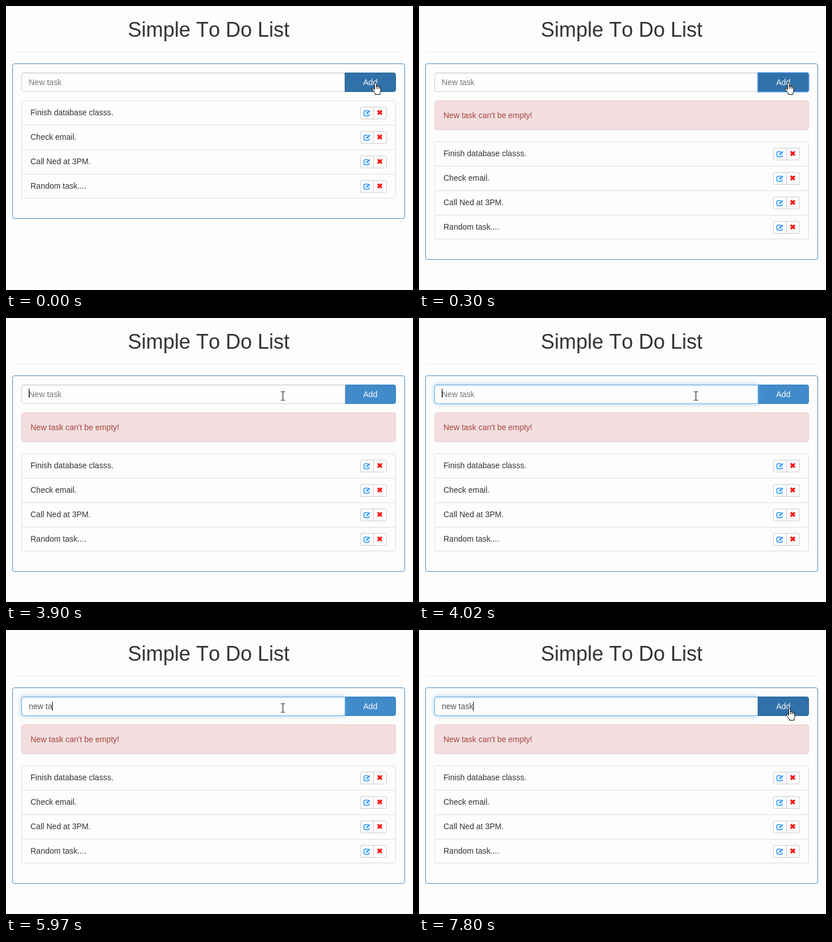
An HTML page that plays this animation: 715 px wide and 499 px high, repeating every 8 s.

```html
<!DOCTYPE html>
<html lang="en">
<head>
<meta charset="utf-8">
<title>Simple To Do List</title>
<style>
* { box-sizing: border-box; }
html, body { margin: 0; width: 100%; height: 100%; overflow: hidden; background: #fdfdfd; }
body { font: 14px/20px "Liberation Sans", Arial, sans-serif; font-kerning: none; color: #333; }
#stage { position: relative; width: 715px; height: 499px; overflow: hidden; }
h1 {
  position: absolute; left: 11px; top: 21px; width: 690px; height: 60px; margin: 0;
  font-size: 36px; font-weight: 400; line-height: 41px; text-align: center;
  border-bottom: 1px solid #eee;
}
#panel {
  position: absolute; left: 11px; top: 101px; width: 690px; padding: 15px;
  border: 1px solid #428bca; border-radius: 4px;
}
#form { position: relative; height: 34px; margin-bottom: 15px; }
#field, #glow { position: absolute; left: 0; top: 0; width: 569px; height: 34px; border-radius: 4px 0 0 4px; }
#field {
  z-index: 2; padding: 6px 12px; white-space: pre; color: #555; background: #fdfdfd;
  border: 1px solid #ccc; box-shadow: inset 0 1px 1px rgba(0,0,0,.075);
}
#glow { z-index: 3; border: 1px solid #66afe9; box-shadow: inset 0 1px 1px rgba(0,0,0,.075), 0 0 8px rgba(102,175,233,.6); }
#hint { position: absolute; left: 12px; top: 6px; color: #777; }
#caret { position: absolute; width: 1px; height: 16px; background: #000; }
#add {
  position: absolute; z-index: 1; left: 568px; top: 0; width: 90px; height: 34px; padding: 6px 0;
  text-align: center; color: #fdfdfd; background: #428bca;
  border: 1px solid #357ebd; border-radius: 0 4px 4px 0;
}
#add.dark { z-index: 4; background: #3071a9; border-color: #285e8e; }
#add.ring { border-color: #4b8ddb; box-shadow: 0 0 0 1px rgba(77,144,254,.6); }
#add.down { box-shadow: inset 0 3px 5px rgba(0,0,0,.125), 0 0 0 1px rgba(77,144,254,.6); }
#alert {
  height: 52px; margin-bottom: 20px; padding: 15px; color: #a94442; background: #f2dede;
  border: 1px solid #ebccd1; border-radius: 4px;
}
ul { list-style: none; margin: 0 0 20px; padding: 0; border: 1px solid #ddd; border-radius: 4px; }
li { position: relative; height: 43px; padding: 10px 15px; }
li:last-child { height: 42px; }
li + li { border-top: 1px solid #ddd; }
li:first-child { height: 42px; }
.tools { position: absolute; right: 15px; top: 10px; width: 47px; height: 22px; border: 1px solid #ccc; border-radius: 3px; }
.tools::after { content: ""; position: absolute; left: 22px; top: 0; width: 1px; height: 20px; background: #ccc; }
.tools svg { position: absolute; top: 4px; left: 5px; width: 12px; height: 12px; }
.tools svg + svg { left: 28px; }
#pointer { position: absolute; left: 0; top: 0; width: 20px; height: 24px; z-index: 9; overflow: visible; }
#pointer g { fill: #fff; stroke: #000; }
#beam { shape-rendering: crispEdges; }
</style>
</head>
<body>
<div id="stage">
  <h1>Simple To Do List</h1>
  <div id="panel">
    <div id="form">
      <div id="field"><span id="hint">New task</span><span id="typed"></span><span id="caret"></span></div>
      <div id="glow"></div>
      <div id="add">Add</div>
    </div>
    <div id="alert">New task can't be empty!</div>
    <ul id="list"></ul>
  </div>
  <svg id="pointer">
    <g id="hand">
      <path d="M5.5 13V2q0-1.5 1.5-1.5T8.5 2V7.5q0-.9 1.5-.9t1.5 1.2q.2-.7 1.5-.6t1.4 1.3q1.6-.3 1.8 1.2V15q0 2-1.2 3.6V21.5H6.5V19.5L3 14.5Q.6 11.5 1.2 10.4Q2.6 9.2 5.5 13z"/>
      <path d="M8.5 7.5V11M11.5 8V11.5M14.4 8.6V11.5"/>
    </g>
    <g id="beam"><path d="M1.5 .5H3.5M1 .5H4M5 .5H8M4.5 1V15M1 15.5H4M5 15.5H8"/></g>
    <g id="arrow"><path d="M.5 .8V16.4L4 13L6.3 18.3L8.7 17.3L6.4 12H11.3z"/></g>
  </svg>
</div>
<script>
const LOOP = 8000;
const $ = id => document.getElementById(id);

const icons = `<span class="tools">
  <svg viewBox="0 0 12 12"><path d="M7.6 1.9H2.8A2 2 0 0 0 .8 3.9V9a2 2 0 0 0 2 2H8a2 2 0 0 0 2-2V7.4" fill="none" stroke="#1e90ff" stroke-width="1.5"/>
  <path d="M4.4 8.3L5 6L10 1L11.8 2.8L6.7 7.8z" fill="#1e90ff"/></svg>
  <svg viewBox="0 0 12 12"><path d="M2 1.7L9 8.7M9 1.7L2 8.7" stroke="#f11" stroke-width="3.2"/></svg></span>`;
$("list").innerHTML = ["Finish database classs.", "Check email.", "Call Ned at 3PM.", "Random task...."]
  .map(task => `<li>${task}${icons}</li>`).join("");

// Each track lists [start, ...values]; a value holds until the next start.
const tracks = {
  pointer: [
    [0, "hand", 648, 134],
    [1360, "hand", 641, 134], [1420, "hand", 614, 135], [1480, "beam", 566, 136],
    [1540, "beam", 522, 137], [1600, "beam", 495, 137], [1660, "beam", 486, 137],
    [7200, "beam", 502, 141], [7260, "arrow", 545, 154], [7310, "arrow", 574, 166],
    [7680, "arrow", 590, 159], [7740, "hand", 630, 144], [7800, "hand", 650, 137]
  ],
  button: [[0, "dark"], [180, "dark down"], [300, "dark ring"], [3900, ""], [7740, "dark"]],
  glow: [[0, 0], [3960, .4], [4020, 1]],
  caret: [[0, 0], [3900, 1], [4640, 0], [5130, 1], [7140, 0], [7620, 1]]
};
const keys = [5430, 5560, 5650, 5730, 5910, 5970, 6460, 6580];
const hotspot = { hand: [6, 0], beam: [4, 8], arrow: [0, 0] };

const at = (track, t) => track.filter(step => step[0] <= t).pop().slice(1);

function draw(t) {
  const typed = "new task".slice(0, keys.filter(k => k <= t).length);
  $("typed").textContent = typed;
  $("hint").style.display = typed ? "none" : "";
  $("caret").style.top = typed ? "8px" : "6px";
  $("caret").style.opacity = at(tracks.caret, t)[0];
  $("glow").style.opacity = at(tracks.glow, t)[0];
  $("add").className = at(tracks.button, t)[0];
  $("alert").style.display = t < 300 ? "none" : "";

  const [kind, x, y] = at(tracks.pointer, t);
  const [dx, dy] = hotspot[kind];
  for (const name in hotspot) $(name).style.display = name === kind ? "" : "none";
  $("pointer").style.transform = `translate(${x - dx}px, ${y - dy}px)`;
}

const begin = performance.now();
function tick() {
  draw((performance.now() - begin) % LOOP);
  requestAnimationFrame(tick);
}
tick();
</script>
</body>
</html>
```
